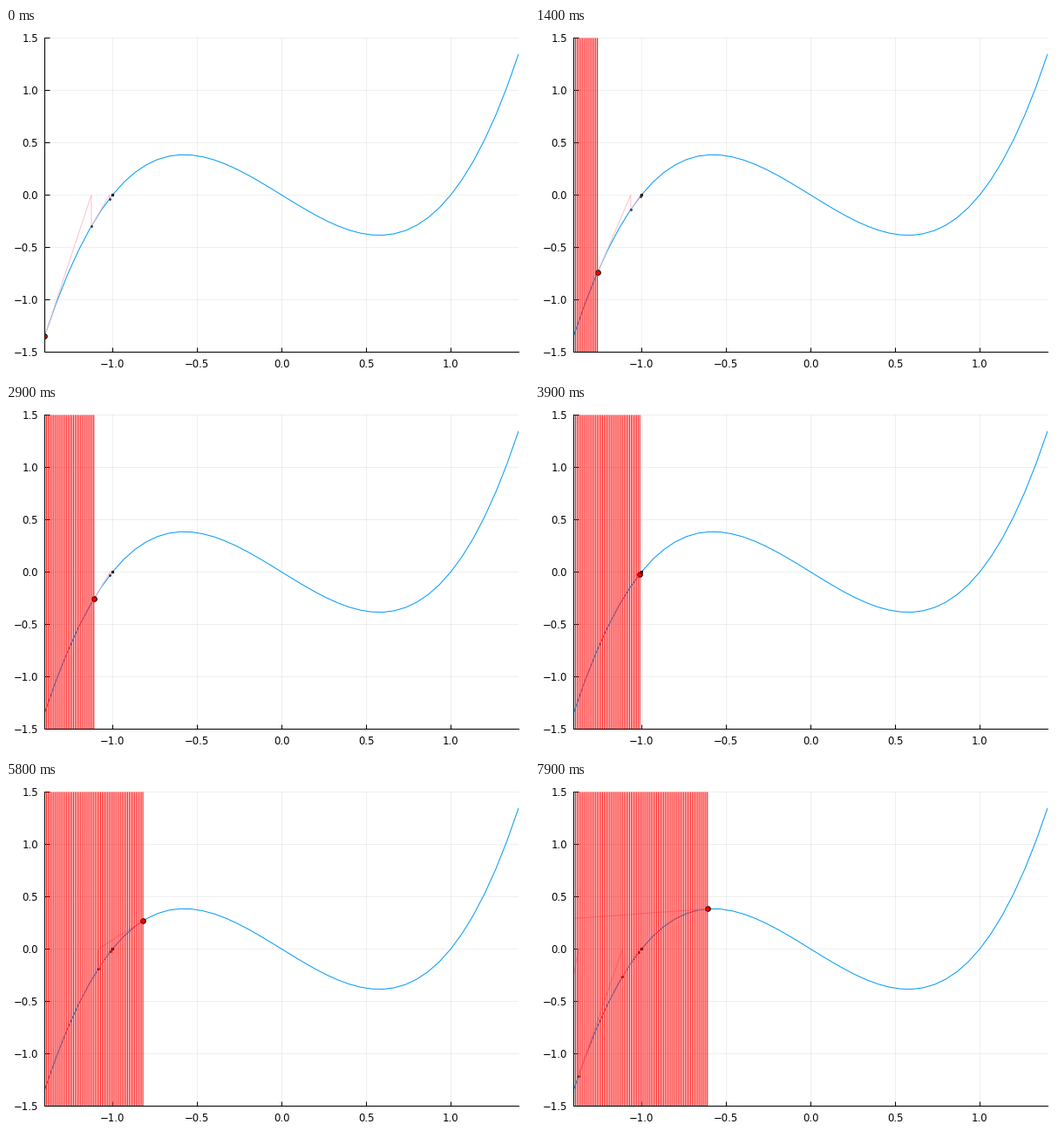
A matplotlib script for the animation above (8 s loop, 600 by 400 pixels).

```python
import numpy as np
import matplotlib.pyplot as plt
from matplotlib.animation import FuncAnimation
from matplotlib.ticker import StrMethodFormatter

W, H, DPI = 600, 400, 100
LEFT, RIGHT, TOP, BOTTOM = 44.48, 587.9, 11.45, 371.3
FRAMES, START, STEP = 80, -1.4, 0.01
PX = 72 / DPI  # points per pixel

plt.rcParams["font.family"] = "DejaVu Sans"


def f(x):
    return x**3 - x


def newton(x, n=10):
    """Successive Newton estimates for a root of f."""
    xs = [x]
    for _ in range(n):
        x = x - f(x) / (3 * x**2 - 1)
        xs.append(x)
    return np.array(xs)


def zigzag(xs):
    """Tangent down to the axis, then vertically back to the curve."""
    px = np.repeat(xs, 2)[1:]
    py = np.zeros(len(px))
    py[::2] = f(xs)
    return px, py


fig = plt.figure(figsize=(W / DPI, H / DPI), dpi=DPI, facecolor="white")
ax = fig.add_axes([LEFT / W, 1 - BOTTOM / H,
                   (RIGHT - LEFT) / W, (BOTTOM - TOP) / H])
ax.set(xlim=(-1.4, 1.4), ylim=(-1.5, 1.5),
       xticks=np.arange(-1, 1.1, 0.5), yticks=np.arange(-1.5, 1.6, 0.5))
for axis in (ax.xaxis, ax.yaxis):
    axis.set_major_formatter(StrMethodFormatter("{x:.1f}"))
ax.tick_params(direction="in", length=5.5 * PX, width=PX, labelsize=8.4)
ax.tick_params(axis="x", pad=7.3 * PX)
ax.tick_params(axis="y", pad=7.5 * PX)
ax.grid(color="black", alpha=0.1, linewidth=0.6 * PX)
ax.spines[["top", "right"]].set_visible(False)
for side in ("left", "bottom"):
    ax.spines[side].set(linewidth=PX, zorder=7)

grid = np.linspace(-1.4, 1.4, 43)
ax.plot(grid, f(grid), color="#009AFA", lw=PX, zorder=2)

path, = ax.plot([], [], color="pink", lw=PX, zorder=3)
dot, = ax.plot([], [], "o", color="red", mec="black",
               ms=5.6 * PX, mew=PX, zorder=4)
steps, = ax.plot([], [], "o", color="pink", mec="black",
                 ms=1.7 * PX, mew=0.9 * PX, zorder=5)
bars = ax.vlines([], -1.5, 1.5, color="red", lw=PX, zorder=6)
bars.set_snap(False)

starts = START + STEP * np.arange(FRAMES)
segments = [[(x, -1.5), (x, 1.5)] for x in starts]


def draw(k):
    xs = newton(starts[k])
    path.set_data(*zigzag(xs))
    dot.set_data(xs[:1], f(xs[:1]))
    steps.set_data(xs[1:], f(xs[1:]))
    bars.set_segments(segments[:k + 1])
    return path, dot, steps, bars


anim = FuncAnimation(fig, draw, frames=FRAMES, interval=100,
                     repeat=True, repeat_delay=0)
plt.show()
```
